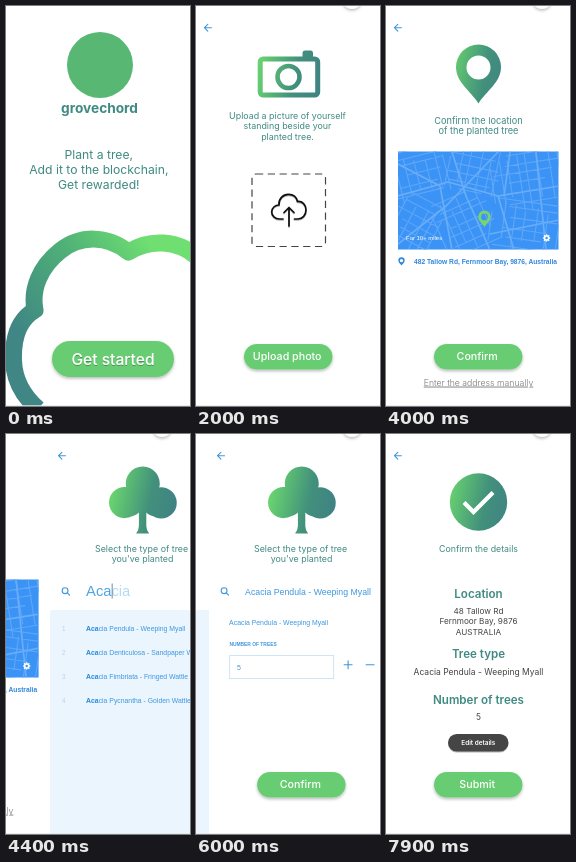
An HTML page that plays this animation: 184 by 400 pixels, repeating every 8000 ms.

```html
<!DOCTYPE html>
<html lang="en">
<head>
<meta charset="utf-8">
<title>Tree planting app</title>
<style>
  html, body { margin: 0; width: 100%; height: 100%; overflow: hidden; background: #fff; }
  svg { display: block; width: 184px; height: 400px; font-family: Inter, "Open Sans", sans-serif; }
  .arial { font-family: "Liberation Sans", Arial, sans-serif; }
  .line { fill: none; stroke-linecap: round; stroke-linejoin: round; }
</style>
</head>
<body>
<svg id="stage" viewBox="0 0 184 400" xmlns="http://www.w3.org/2000/svg">
  <defs>
    <linearGradient id="icon" gradientUnits="userSpaceOnUse" x1="60" y1="60" x2="126" y2="74">
      <stop offset="0" stop-color="#6ad66e"/>
      <stop offset=".6" stop-color="#42907c"/>
      <stop offset="1" stop-color="#3f8283"/>
    </linearGradient>
    <linearGradient id="pinFill" href="#icon" x1="-32" y1="-38" x2="33" y2="-24"/>
    <linearGradient id="cloud" gradientUnits="userSpaceOnUse" x1="140" y1="232" x2="12" y2="325">
      <stop offset="0" stop-color="#6fdf72"/>
      <stop offset=".45" stop-color="#4fb077"/>
      <stop offset="1" stop-color="#3f8684"/>
    </linearGradient>
    <filter id="drop" x="-20%" y="-30%" width="140%" height="180%">
      <feDropShadow dx="0" dy="1.6" stdDeviation="1.5" flood-color="#000" flood-opacity=".28"/>
    </filter>
    <filter id="soft" x="-20%" y="-30%" width="140%" height="180%">
      <feDropShadow dx="0" dy="1" stdDeviation=".7" flood-color="#000" flood-opacity=".3"/>
    </filter>
    <clipPath id="mapClip"><rect x="12" y="145.5" width="160.5" height="98"/></clipPath>
  </defs>
  <g id="strip"></g>
  <circle id="knob" cx="156" cy="-6.5" r="9.5" fill="#fff" filter="url(#drop)"/>
  <path d="M0 399.6H184" stroke="#e4e4e4" stroke-width=".8"/>
</svg>
<script>
const W = 184, LOOP = 8000, STEP = 100, DECAY = 70;
const PUSHES = [300, 2350, 4300, 5815, 7250];
const TEAL = '#3f8a82', GREEN = '#68cd72', BLUE = '#3f97dd';

const text = (x, y, size, fill, str, extra = '') =>
  `<text x="${x}" y="${y}" font-size="${size}" fill="${fill}" ${extra}>${str}</text>`;
const mid = (y, size, fill, str, extra = '', x = 92.5) =>
  text(x, y, size, fill, str, 'text-anchor="middle" ' + extra);
const arial = (x, y, size, fill, str, extra = '') =>
  text(x, y, size, fill, str, 'class="arial" ' + extra);
const line = (d, color, width, extra = '') =>
  `<path class="line" d="${d}" stroke="${color}" stroke-width="${width}" ${extra}/>`;
const rect = (x, y, w, h, fill, extra = '') =>
  `<rect x="${x}" y="${y}" width="${w}" height="${h}" fill="${fill}" ${extra}/>`;
const circle = (x, y, r, fill, extra = '') =>
  `<circle cx="${x}" cy="${y}" r="${r}" fill="${fill}" ${extra}/>`;

const back = () => line('M15.4 21.7H8.6M11.8 18.3L8.4 21.7L11.8 25.1', '#3f98dc', 1.1);
const search = () => circle(15, 156.7, 2.9, 'none', `stroke="${BLUE}" stroke-width="1.1"`) +
  line('M17.2 158.9L19.4 161.1', BLUE, 1.2);
const button = label => rect(48, 338, 88.5, 25.5, GREEN, 'rx="12.75" filter="url(#drop)"') +
  mid(354.4, 10.7, '#fff', label, 'font-weight="500"', 91.2);

// Map pin with its tip at (x, y); s = 1 gives the large icon
const pin = (x, y, s, fill) =>
  `<path transform="translate(${x} ${y}) scale(${s})" fill="${fill}" fill-rule="evenodd"
    d="M0 0C-8 -13 -22.5 -21 -22.5 -36.5A22.5 22.5 0 0 1 22.5 -36.5C22.5 -21 8 -13 0 0Z
    M-12 -36A12 12 0 0 0 12 -36A12 12 0 0 0 -12 -36Z"/>`;

const tree = () => `<path fill="url(#icon)" d="M76 53A17 17 0 1 1 109.2 53.4
  A15.6 15.6 0 1 1 103 82.2C100 81.5 98 80.5 96.2 78.6V92Q96.4 97 99 99.5H86Q88.6 97 88.8 92
  V78.6C87 80.5 85 81.5 82 82.2A15.6 15.6 0 1 1 76 53Z"/>`;

function streets() {
  let seed = 11;
  const rnd = () => (seed = seed * 16807 % 2147483647) / 2147483647;
  // Each district: centre, half extents, angle
  const districts = [
    [35, 168, 32, 26, -14], [88, 165, 26, 24, 12], [142, 172, 36, 32, -9],
    [30, 220, 28, 28, 28], [80, 218, 28, 30, -24], [140, 222, 36, 26, 8]
  ];
  let out = '';
  for (const [x, y, w, h, turn] of districts) {
    let d = '';
    for (let u = -w; u < w; u += 7 + rnd() * 6) d += `M${u} ${-h * (.4 + rnd() * .6)}V${h * (.4 + rnd() * .6)}`;
    for (let v = -h; v < h; v += 6 + rnd() * 6) d += `M${-w * (.4 + rnd() * .6)} ${v}H${w * (.4 + rnd() * .6)}`;
    out += `<g transform="translate(${x} ${y}) rotate(${turn})">${line(d, '#5fa7f8', 1.1)}</g>`;
  }
  const roads = 'M12 190L62 176L112 190L173 180M66 146L80 190L104 244M12 238L60 200L112 146' +
    'M112 190L128 244M124 146L118 190M12 158L54 180L66 244M104 228L173 214M150 146L160 244';
  return out + line(roads, '#69adf8', 1.7);
}

function gear(x, y) {
  let teeth = '';
  for (let i = 0; i < 8; i++) {
    const a = i * Math.PI / 4;
    teeth += `M${x} ${y}L${x + 3.1 * Math.cos(a)} ${y + 3.1 * Math.sin(a)}`;
  }
  return line(teeth, '#fff', 1.5) + circle(x, y, 2.7, '#fff') + circle(x, y, 1.2, '#3a93f5');
}

const home = () =>
  circle(94, 59, 33, '#58b873') +
  mid(107, 13.7, TEAL, 'grovechord', 'font-weight="700"', 93.5) +
  ['Plant a tree,', 'Add it to the blockchain,', 'Get rewarded!']
    .map((s, i) => mid(153 + i * 15, 12.2, TEAL, s, '', 92.8)).join('') +
  line('M192 252C172 233 143 233 122.5 246C101 229 74 229 54 245C34 261 25 283 29 304' +
    'C10 315 7 336 7.5 354C8 373 16 389 32 403', 'url(#cloud)', 17, 'style="stroke-linecap:butt"') +
  rect(46, 335, 122, 36, GREEN, 'rx="18" filter="url(#drop)"') +
  mid(358.6, 15.6, '#fff', 'Get started', 'font-weight="500" filter="url(#soft)"', 107);

const upload = () => back() +
  rect(64.2, 53, 57.5, 36, 'none', 'rx="3" stroke="url(#icon)" stroke-width="5"') +
  rect(106.5, 44.5, 10.5, 8, 'url(#icon)', 'rx="2.5"') +
  circle(92.5, 71, 11, 'none', 'stroke="url(#icon)" stroke-width="4.6"') +
  ['Upload a picture of yourself', 'standing beside your', 'planted tree.']
    .map((s, i) => mid(112.8 + i * 10.4, 8.9, TEAL, s, '', 91.5)).join('') +
  rect(56, 168, 73.5, 72.5, '#fff', 'rx="4" stroke="#444" stroke-width="1.2" stroke-dasharray="7.2 4.6"') +
  `<g filter="url(#soft)">` +
  line('M87 213H83.5C79 213 75.7 209.7 75.7 206C75.7 202 79 199 83 199C82.5 193 87 188.4 92.5 188.4' +
    'C97 188.4 100.5 191 101.5 195.5C106.5 195 110 199 110 204C110 209 106.5 213 102 213H98.5' +
    'M93 220V201.5M88 206.5L93 201.5L98 206.5', '#111', 1.7) + '</g>' +
  button('Upload photo');

const place = () => back() +
  pin(92.5, 97.5, 1, 'url(#pinFill)') +
  mid(117.8, 9.2, TEAL, 'Confirm the location') +
  mid(128.4, 9.2, TEAL, 'of the planted tree') +
  rect(12, 145.5, 160.5, 98, '#3a93f5') +
  `<g clip-path="url(#mapClip)">${streets()}</g>` +
  pin(98.5, 221, .28, '#76d273') +
  arial(20, 234.4, 5.95, '#fff', 'Far 10+ miles') + gear(160.6, 232) +
  pin(15.5, 259.6, .14, '#2f86dd') +
  arial(28, 258, 6.68, '#2f86dd', '482 Tallow Rd, Fernmoor Bay, 9876, Australia', 'font-weight="700"') +
  button('Confirm') +
  mid(379.6, 8.7, '#777', 'Enter the address manually', 'font-weight="300" text-decoration="underline"');

const heading = () => back() + tree() +
  mid(117.8, 8.9, TEAL, 'Select the type of tree', '', 91.5) +
  mid(128.4, 8.9, TEAL, "you've planted", '', 92.5) + search();

const species = ['Pendula - Weeping Myall', 'Denticulosa - Sandpaper Wattle',
  'Fimbriata - Fringed Wattle', 'Pycnantha - Golden Wattle'];
const select = () => heading() +
  rect(0, 176, W, 224, '#ebf5fe') +
  arial(36, 162, 14.7, '#4fa3e3', 'Aca<tspan fill="#b4daf2">cia</tspan>') +
  rect(61.6, 149.5, .9, 15, '#5b7f9c') +
  species.map((s, i) => {
    const y = 196.7 + i * 24.2;
    return arial(12, y, 6.4, '#b5d3ee', i + 1) +
      arial(36, y, 6.85, BLUE, `<tspan font-weight="700" fill="#2585d8">Aca</tspan>cia ${s}`);
  }).join('');

const amount = () => heading() +
  arial(36, 161.3, 8.75, BLUE, 'Acacia Pendula - Weeping Myall') +
  arial(20, 191, 6.9, BLUE, 'Acacia Pendula - Weeping Myall') +
  arial(20.3, 212, 4.9, BLUE, 'NUMBER OF TREES', 'font-weight="700"') +
  rect(20.5, 221.5, 104, 23, '#fff', 'stroke="#cfe5f3" stroke-width="1"') +
  arial(28, 235.6, 7, BLUE, '5') +
  line('M135 230.7H143M139 226.7V234.7M157 230.7H165', BLUE, 1.1) +
  button('Confirm');

const review = () => back() +
  circle(92.5, 68, 28.7, 'url(#icon)') +
  line('M78 68.5L87.5 78L107 58.5', '#fff', 4.2, 'style="stroke-linecap:butt;stroke-linejoin:miter"') +
  mid(117.8, 8.8, TEAL, 'Confirm the details') +
  [['Location', 164], ['Tree type', 224.4], ['Number of trees', 269.6]]
    .map(([s, y]) => mid(y, 11.6, TEAL, s, 'font-weight="600"')).join('') +
  ['48 Tallow Rd', 'Fernmoor Bay, 9876', 'AUSTRALIA']
    .map((s, i) => mid(180 + i * 10.4, 8.2, '#444', s)).join('') +
  mid(241, 8.5, '#444', 'Acacia Pendula - Weeping Myall') +
  mid(286, 8.4, '#444', '5') +
  rect(62, 300, 60.5, 17.5, '#454545', 'rx="8.75" filter="url(#soft)"') +
  mid(311.3, 6.4, '#fff', 'Edit details', 'font-weight="600"', 92.3) +
  button('Submit');

const strip = document.getElementById('strip');
const knob = document.getElementById('knob');
strip.innerHTML = [home, upload, place, select, amount, review].map((draw, i) =>
  `<svg x="${i * W}" y="0" width="${W}" height="400" style="width:${W}px;overflow:hidden">` +
  rect(0, 0, W, 400, '#fff') + draw() + '</svg>').join('');

const slide = age => age <= 0 ? 0 : age > 600 ? 1 : 1 - Math.exp(-age / DECAY);

function render(now) {
  const t = Math.floor(now % LOOP / STEP) * STEP;
  const page = PUSHES.reduce((sum, start) => sum + slide(t - start), 0);
  strip.setAttribute('transform', `translate(${(-W * page).toFixed(2)} 0)`);
  knob.setAttribute('visibility', t > PUSHES[0] ? 'visible' : 'hidden');
}

function tick() {
  render(performance.now());
  requestAnimationFrame(tick);
}
tick();
</script>
</body>
</html>
```
